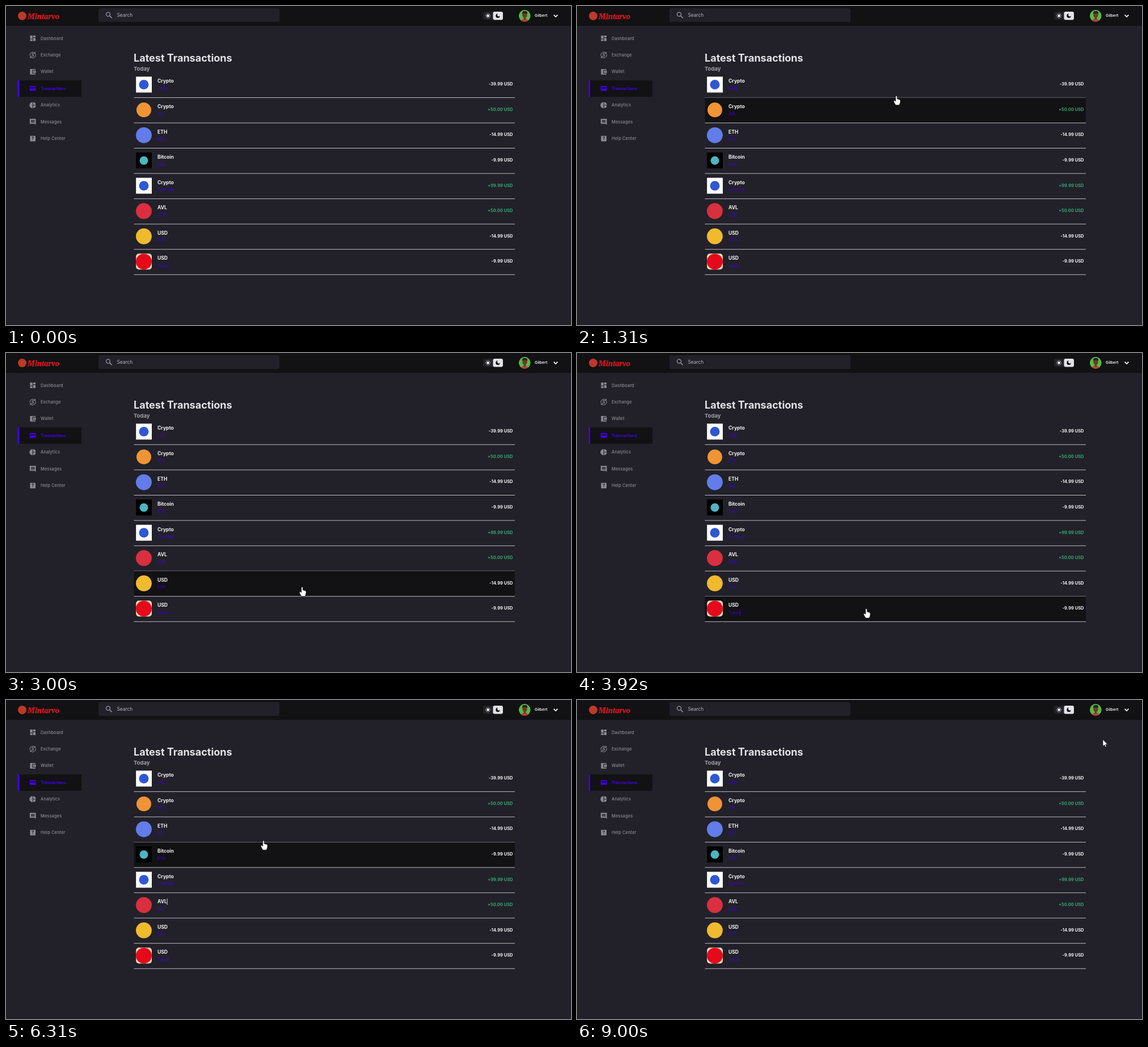
Animation of 996x562 px, one loop 9080 ms. Source, as an HTML page:

```html
<!DOCTYPE html>
<html lang="en">
<head>
<meta charset="utf-8">
<title>Latest Transactions</title>
<style>
  html, body { margin: 0; width: 100%; height: 100%; overflow: hidden; background: #222129; }
  svg { display: block; width: 100vw; height: 100vh; }
  text { font-family: Inter, Roboto, sans-serif; }
  .brand { font-family: "Liberation Serif", serif; font-weight: 700; font-style: italic; }
</style>
</head>
<body>
<svg id="stage" viewBox="0 0 996 562"></svg>
<script>
const NS = 'http://www.w3.org/2000/svg';
const LOOP = 9080, STEP = 76.95;
const TOP = 116.85, PITCH = 44.55, DETAIL = 48.7;
const LEFT = 225.5, RIGHT = 897;
const BLUE = '#3d00e0', ACTIVE = '#4400f2', GREY = '#8b8a90', WHITE = '#f1f1f3', GREEN = '#33a571', DARK = '#121114';

const stage = document.getElementById('stage');

function add(parent, tag, attrs) {
  const el = document.createElementNS(NS, tag);
  for (const key in attrs) el.setAttribute(key, attrs[key]);
  return parent.appendChild(el);
}
const rect = (p, x, y, width, height, fill, rx = 0) => add(p, 'rect', { x, y, width, height, fill, rx });
const circle = (p, cx, cy, r, fill) => add(p, 'circle', { cx, cy, r, fill });
const fillPath = (p, d, fill) => add(p, 'path', { d, fill, 'fill-rule': 'evenodd' });
const line = (p, d, stroke, width) => add(p, 'path', { d, stroke, 'stroke-width': width, fill: 'none' });
function text(p, str, x, y, size, fill, weight = 400, extra = {}) {
  const el = add(p, 'text', { x, y, 'font-size': size, fill, 'font-weight': weight, ...extra });
  el.textContent = str;
  return el;
}
const move = (el, x, y) => el.setAttribute('transform', `translate(${x} ${y})`);
const show = (el, on) => el.setAttribute('visibility', on ? 'visible' : 'hidden');

function drawHeader() {
  rect(stage, 0, 0, 996, 35, DARK);
  circle(stage, 28.5, 17.5, 7.5, '#bd3a28');
  text(stage, 'Mintarvo', 38, 22.5, 14.6, '#d3171e', 700, { class: 'brand', stroke: '#d3171e', 'stroke-width': 0.4 });

  rect(stage, 163, 4, 319, 24, '#222129', 3);
  add(stage, 'circle', { cx: 180, cy: 14.6, r: 3.5, fill: 'none', stroke: '#9b9aa0', 'stroke-width': 1.3 });
  line(stage, 'M182.6 17.2L186.6 21.2', '#9b9aa0', 1.6);
  text(stage, 'Search', 195.5, 18.5, 8.3, '#b7b6bb');

  rect(stage, 841, 10, 35, 14.5, '#222129', 3);
  rect(stage, 858.5, 10, 17.5, 14.5, '#e3e2e6', 3);
  circle(stage, 849.7, 17.3, 2.2, '#fff');
  for (let i = 0; i < 8; i++) {
    add(stage, 'path', { d: 'M0 -3.1V-4.5', stroke: '#fff', 'stroke-width': 1, transform: `translate(849.7 17.3) rotate(${i * 45})` });
  }
  fillPath(stage, 'M867 13.5A3.8 3.8 0 1 0 870.9 17.6A2.6 2.6 0 0 1 867 13.5Z', DARK);

  const clip = add(add(stage, 'defs', {}), 'clipPath', { id: 'face' });
  circle(clip, 914.3, 17.3, 10.5, '#fff');
  const avatar = add(stage, 'g', { 'clip-path': 'url(#face)' });
  circle(avatar, 914.3, 17.3, 10.5, '#57b947');
  add(avatar, 'ellipse', { cx: 914.3, cy: 27.5, rx: 6.8, ry: 5, fill: '#b4413a' });
  rect(avatar, 912.6, 19, 3.6, 5, '#6a3a28', 1);
  add(avatar, 'ellipse', { cx: 914.5, cy: 15.8, rx: 4.2, ry: 5.4, fill: '#6a3a28' });
  fillPath(avatar, 'M909.8 14Q909.5 8.6 914.5 8.8Q919.6 8.6 919.2 14Q914.5 11.5 909.8 14Z', '#29201f');

  text(stage, 'Gilbert', 932, 19.2, 6.8, '#f3f3f5', 600, { 'letter-spacing': 0.05 });
  line(stage, 'M965.6 15.6L969 19L972.4 15.6', '#fff', 1.7);
}

// Icons sit on a 24-unit grid centred on 12,12.
const NAV = [
  ['Dashboard', 'M3 3H11V13H3ZM13 3H21V9H13ZM3 15H11V21H3ZM13 11H21V21H13Z'],
  ['Exchange', ''],
  ['Wallet', 'M3 3H21V6H10V18H21V21H3ZM12 8H22V16H12ZM16 10.5A1.5 1.5 0 1 0 16 13.5A1.5 1.5 0 1 0 16 10.5Z'],
  ['Transactions', 'M4 4H20Q22 4 22 6V18Q22 20 20 20H4Q2 20 2 18V6Q2 4 4 4ZM4 8H20V12H4Z'],
  ['Analytics', 'M11 2V22A10 10 0 0 1 11 2ZM13 2A10 10 0 0 1 22 11H13ZM13 13H22A10 10 0 0 1 13 22Z'],
  ['Messages', 'M2 2H22V22L18 18H2ZM6 6H18V8H6ZM6 9H18V11H6ZM6 12H18V14H6Z'],
  ['Help Center', 'M3 3H21V21H3Z']
];

function drawNav() {
  rect(stage, 21, 131, 112, 29, DARK);
  rect(stage, 20.6, 131, 2.6, 29, ACTIVE);
  NAV.forEach(([name, d], i) => {
    const active = name === 'Transactions';
    const color = active ? ACTIVE : GREY;
    const y = 56.9 + 29.45 * i;
    const icon = add(stage, 'g', { transform: `translate(40.8 ${y - 6.4}) scale(.535)` });
    if (d) fillPath(icon, d, color);
    if (name === 'Exchange') {
      line(icon, 'M3 15A9.6 9.6 0 0 1 19 5.5M21 9A9.6 9.6 0 0 1 5 18.5M20 2V7H15M4 22V17H9', color, 2);
      text(icon, '$', 12, 17, 14, color, 600, { 'text-anchor': 'middle' });
    }
    if (name === 'Help Center') text(icon, '?', 12, 17.4, 15, '#222129', 700, { 'text-anchor': 'middle' });
    text(stage, name, 61, y + 2.6, active ? 7.05 : 7.4, color, active ? 700 : 500, { 'letter-spacing': active ? 0 : 0.14 });
  });
}

// title, label, amount, tile colour, disc colour, disc radius
const ROWS = [
  ['Crypto', 'USD', '-39.99', '#fff', '#2f57d3', 8.5],
  ['Crypto', 'AVL', '+50.00', '', '#ef9435', 13],
  ['ETH', 'BTC', '-14.99', '', '#627ce9', 14],
  ['Bitcoin', 'ETH', '-9.99', '#000', '#4cb5c4', 7.5],
  ['Crypto', 'Card fee', '+99.99', '#fff', '#2f57d3', 8.5],
  ['AVL', 'USD', '+50.00', '', '#d92f3f', 14],
  ['USD', 'ETH', '-14.99', '', '#f0ba2f', 14],
  ['USD', 'Token', '-9.99', '#f0dcc0', '#e6091a', 14]
];

function drawRow([title, label, amount, tile, disc, radius], i) {
  const g = add(stage, 'g', {});
  const back = rect(g, LEFT, 0, RIGHT - LEFT, PITCH - 0.5, DARK);
  if (tile) rect(g, 229.2, 7.6, 27.8, 28, tile, i === 7 ? 5 : 0);
  circle(g, 243, 21.7, radius, disc);
  const lines = [
    text(g, title, 267, 18.6, 8.55, WHITE, 700),
    text(g, label, 267, 31, 7.1, BLUE)
  ];
  text(g, amount + ' USD', 893.5, 23.5, 7.5, amount[0] === '+' ? GREEN : WHITE, 700, { 'text-anchor': 'end' });
  return { g, back, lines, border: rect(stage, LEFT, 0, RIGHT - LEFT, 1, '#bcbbc0') };
}

function drawDetail() {
  const g = add(stage, 'g', {});
  [[239, 'Time', '7.49am'], [292.5, 'Card used', '•••• 6890'], [357, 'Reference ID', '3125-568913']].forEach(([x, name, value]) => {
    text(g, name, x, 20.8, 6.9, WHITE, 700);
    text(g, value, x, 31.8, 7, '#e2e1e5');
  });
  return g;
}

drawHeader();
drawNav();
text(stage, 'Latest Transactions', 225, 98.2, 18.05, '#e3e2e7', 700);
text(stage, 'Today', 225, 114, 9.5, '#a1a0a6', 700);
const rows = ROWS.map(drawRow);
const detail = drawDetail();
const caret = rect(stage, 0, 0, 0.9, 11, BLUE);
const outline = { fill: '#fff', stroke: '#111', 'stroke-width': 0.7, 'stroke-linejoin': 'round' };
const hand = add(stage, 'path', {
  d: 'M-1.3 1Q0 -.8 1.3 1V5.6L5.6 6.8Q7.4 7.4 7.1 9.6L6.6 12.8L5.2 16.6H-1.2L-3.8 12.2Q-5.4 9.8 -4.4 8.8Q-3 8 -1.3 10Z', ...outline });
const arrow = add(stage, 'path', { d: 'M0 0V12L2.8 9.5L4.6 13.5L6.5 12.7L4.7 8.8H8.4Z', ...outline });

// Pointer path: time, x, y
const PATH = [
  [70, 640, 556], [920, 592, 232], [1308, 562, 158], [1690, 556, 150], [2000, 556, 150],
  [2850, 525, 377], [3001, 521, 412], [3380, 514, 461], [3850, 512, 461], [4150, 500, 418],
  [4540, 496, 413], [4690, 497, 411.5], [4850, 496, 411], [5150, 489, 367], [5310, 488, 361],
  [6080, 485, 361], [6310, 453, 247.5], [6850, 423, 152], [7310, 419, 148], [7850, 421, 149],
  [8770, 913, 79], [9000, 927, 69.5]
];
// Clicks toggle a row and put the caret in its title (0) or label (1): time, row, line
const CLICKS = [
  [0, -1, 1], [3525, 7, 1], [3835, 7, 1], [4215, 6, 1], [4835, 6, 1],
  [5525, 5, 0], [6065, 5, 0], [6915, 0, 1], [7215, 0, 1]
];

function pointerAt(t) {
  const next = PATH.findIndex(p => p[0] > t);
  if (next < 0) return PATH[PATH.length - 1].slice(1);
  const a = PATH[Math.max(0, next - 1)], b = PATH[next];
  const k = b === a ? 0 : (t - a[0]) / (b[0] - a[0]);
  return [a[1] + (b[1] - a[1]) * k, a[2] + (b[2] - a[2]) * k];
}

function render(now) {
  const t = Math.floor((now % LOOP + 5) / STEP) * STEP;
  let open = -1, last = CLICKS[0];
  for (const click of CLICKS) {
    if (click[0] > t) break;
    last = click;
    open = open === click[1] ? -1 : click[1];
  }

  const [x, y] = pointerAt(t);
  const visible = t >= PATH[0][0];
  const top = i => TOP + PITCH * i + (open >= 0 && i > open ? DETAIL : 0);
  let hovered = -1;
  rows.forEach((row, i) => {
    const start = top(i);
    const end = start + PITCH;
    const over = visible && x > LEFT && x < RIGHT && y + 3.5 >= start && y + 3.5 < end;
    if (over) hovered = i;
    move(row.g, 0, start);
    show(row.back, over);
    row.border.setAttribute('y', end + (i === open ? DETAIL : 0) - 0.5);
  });

  show(detail, open >= 0);
  if (open >= 0) move(detail, 0, top(open) + PITCH);

  const row = Math.max(0, last[1]);
  const target = rows[row].lines[last[2]];
  show(caret, (t - last[0]) % 1060 < 530);
  caret.setAttribute('fill', last[2] ? BLUE : WHITE);
  move(caret, 266.7 + target.getComputedTextLength(), top(row) + (last[2] ? 23 : 10.3));

  show(hand, visible && hovered >= 0);
  show(arrow, visible && hovered < 0);
  move(hand, x + 1, y);
  move(arrow, x, y);
}

const begin = performance.now();
function tick() {
  render(performance.now() - begin);
  requestAnimationFrame(tick);
}
tick();
</script>
</body>
</html>
```
